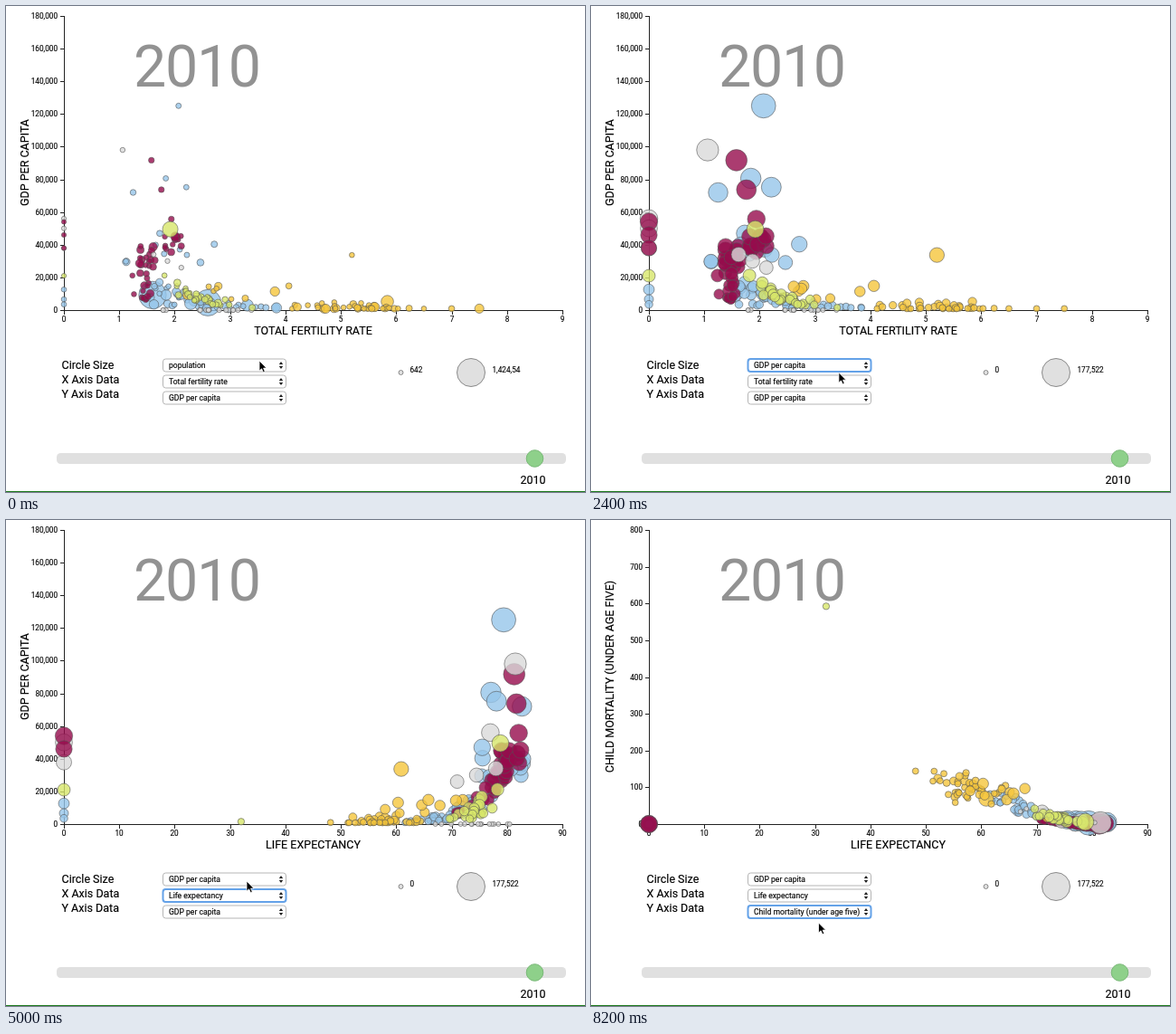
An HTML page for the animation above (8300 ms loop, 640 by 537 pixels).

```html
<!DOCTYPE html>
<html lang="en">
<head>
<meta charset="utf-8">
<title>Fertility, income and health</title>
<style>
html, body { margin: 0; width: 100%; height: 100%; overflow: hidden; background: #fff; }
svg { display: block; width: 100vw; height: 100vh; font-family: Roboto, sans-serif; }
.tick { font-size: 8.2px; stroke: #000; stroke-width: .12px; }
.label { font-size: 12.5px; stroke: #000; stroke-width: .15px; }
.opt { font-size: 8.6px; stroke: #000; stroke-width: .15px; }
.line { stroke: #222; fill: none; shape-rendering: crispEdges; }
.key { fill: #e0e0e0; stroke: #8a8a8a; }
.dots circle { fill-opacity: .8; stroke: #555; stroke-width: .9; stroke-opacity: .65; }
.select { fill: #fff; stroke: #b5b5b5; }
.focus { fill: none; stroke: #64a2e8; stroke-width: 2; }
.menu { font-family: Inter, sans-serif; font-size: 8.5px; filter: drop-shadow(0 2px 3px rgba(0,0,0,.3)); }
</style>
</head>
<body>
<svg id="stage" viewBox="0 0 640 537" preserveAspectRatio="none"></svg>
<script>
const LOOP = 8300;
const SIZE_AT = 1950, X_AT = 4580, Y_AT = 7760;
const X0 = 64, Y0 = 336, W = 551, H = 325, ROW = 12.4;
const OPTIONS = ['population', 'GDP per capita', 'Child mortality (under age five)',
  'Life expectancy', 'Total fertility rate'];
const stage = document.getElementById('stage');

function add(parent, tag, attrs = {}, text) {
  const el = document.createElementNS(stage.namespaceURI, tag);
  for (const name in attrs) el.setAttribute(name, attrs[name]);
  if (text !== undefined) el.textContent = text;
  parent.append(el);
  return el;
}
const group = (parent, cls) => add(parent, 'g', { class: cls || '' });
const put = (parent, x, y, text, cls, more) =>
  add(parent, 'text', { x, y, class: cls, ...more }, text);
const show = (el, on) => { el.style.display = on ? '' : 'none'; };
const setText = (el, s) => { if (el.textContent !== s) el.textContent = s; };

let seed = 2010;
function rnd() {
  seed = (seed * 1664525 + 1013904223) % 4294967296;
  return seed / 4294967296;
}
const range = (a, b) => a + (b - a) * rnd();
const mid = (a, b) => a + (b - a) * (rnd() + rnd() + rnd()) / 3;

// Countries: income in thousands, people in millions
const COLORS = { asia: '#96c5ea', europe: '#960b4c', africa: '#f5c63c',
  america: '#d7e66a', other: '#d9d9d9' };
const countries = [];

function mortality(region, life) {
  if (!life) return 0;
  if (region === 'africa' && life < 69) return 98 - 2.2 * (life - 57) + mid(-50, 55);
  const base = 4 + .23 * (82 - Math.min(life, 82)) ** 2;
  return base * (region === 'europe' ? .4 : range(.5, 1.25));
}
function country(region, fertility, income, life, people = 1 + 60 * rnd() ** 4) {
  countries.push({ region, fertility, income, life, people, deaths: mortality(region, life) });
}
function crowd(region, count, rule) {
  for (let i = 0; i < count; i++) country(region, ...rule(i));
}
// Income falls with fertility; life expectancy grows with the log of income
const earn = (top, f, low) => top * Math.exp(1.1 * (1.5 - f)) * range(low, 1.3);
const lifespan = (base, slope, income, spread) =>
  base + slope * Math.log(income) + range(-spread, spread);

// Incomplete records sit on the zero line
crowd('other', 3, i => [0, 56 / (1 + .12 * i * i), i ? 0 : 77, .1]);
crowd('america', 1, () => [0, 21, 0, .1]);
crowd('asia', 3, i => [0, 12.6 / 1.9 ** i, 0, 1]);
crowd('europe', 3, i => [0, 54 - 8 * i, i > 1 ? 82 : 0, .1]);

country('asia', 1.6, 9.2, 75.5, 1360);
country('asia', 2.6, 4.5, 66.5, 1230);
country('asia', 2.07, 125, 79.4, 2);
country('asia', 1.25, 72, 82.7, 5);
crowd('asia', 2, i => [1.84 + .37 * i, 80.6 - 5.4 * i, 77.1 + i, 2]);
crowd('asia', 9, () => [range(.9, 3), range(29, 50), range(75, 83)]);
crowd('asia', 42, () => {
  const f = 1.5 + 2.6 * rnd() ** 1.2, income = earn(18, f, .2);
  return [f, income, lifespan(62, 4.6, income, 2.5), 1 + 160 * rnd() ** 4];
});

crowd('europe', 3, i => [1.58 + .18 * i, 91.7 - 18 * i, 81.3 + .4 * i, 4]);
crowd('europe', 32, () => {
  const income = range(6, 42);
  return [mid(1.2, 1.72), income, lifespan(62, 5, income, 1.5)];
});
crowd('europe', 12, () => [range(1.75, 2.12), range(35, 46), range(79, 82.5)]);

country('africa', 5.2, 33.7, 60.9, 1);
country('africa', 5.84, 5.2, 60, 160);
crowd('africa', 42, () => [mid(3.6, 6.8), .8 + 4 * rnd() ** 2.2, mid(47, 68)]);
crowd('africa', 3, i => [7.5 - .5 * i, .9, 58 - i]);
crowd('africa', 9, () => [range(2.1, 4.1), range(5, 15), range(50, 76)]);

country('other', 1.06, 98, 81.5, .6);
crowd('other', 3, i => [1.62 + .25 * i, 34 - 4 * i, 78 - 3.5 * i, .3]);
crowd('other', 16, () => [range(1.6, 3.6), 0, range(67, 81), .2]);

country('america', 3.4, 1.5, 32, 10);
crowd('america', 28, () => {
  const f = mid(1.5, 3.2), income = earn(24, f, .5);
  return [f, income, lifespan(68, 3, income, 2.5)];
});
country('america', 1.92, 49.5, 78.8, 309);

const radius = share => 2.5 + 13 * Math.sqrt(share);

// Static parts
add(stage, 'rect', { width: 640, height: 537, fill: '#fff' });
put(stage, 141, 89, '2010', '',
  { 'font-size': 64.5, 'letter-spacing': -1.3, fill: '#929292' });

function axis(vertical, max, step) {
  const g = group(stage);
  for (let v = 0; v <= max; v += step) {
    const f = v / max;
    if (vertical) {
      const y = Math.round(Y0 - H * f);
      add(g, 'path', { class: 'line', d: `M60 ${y + .5}H64` });
      put(g, 57, y + 3, v.toLocaleString('en-US'), 'tick', { 'text-anchor': 'end' });
    } else {
      const x = Math.round(X0 + W * f);
      add(g, 'path', { class: 'line', d: `M${x + .5} 336V341` });
      put(g, x, 349, v, 'tick', { 'text-anchor': 'middle' });
    }
  }
  return g;
}
const xAxes = [axis(false, 9, 1), axis(false, 90, 10)];
const yAxes = [axis(true, 180000, 20000), axis(true, 800, 100)];
add(stage, 'path', { class: 'line', d: 'M64.5 11V336.5H615' });
const xTitle = put(stage, 339.5, 363, '', 'label', { 'text-anchor': 'middle' });
const yTitle = put(stage, 0, 0, '', 'label',
  { 'text-anchor': 'middle', transform: 'translate(25 173) rotate(-90)' });

const dots = group(stage, 'dots');
for (const c of countries) c.dot = add(dots, 'circle', { fill: COLORS[c.region] });

['Circle Size', 'X Axis Data', 'Y Axis Data'].forEach((s, i) =>
  put(stage, 61.5, 400.5 + 16.3 * i, s, 'label'));

const selects = [397, 415, 433].map(y => {
  const g = group(stage);
  const box = { x: 173.5, y: y - 7, width: 136, height: 14, rx: 3 };
  add(g, 'rect', { class: 'select', ...box });
  const focus = add(g, 'rect', { class: 'focus', ...box });
  add(g, 'path', { d: `M301.8 ${y - 1}l2.2 -3 2.2 3zM301.8 ${y + 1}l2.2 3 2.2 -3z`, fill: '#222' });
  return { focus, text: put(g, 180, y + 3.2, '', 'opt') };
});

add(stage, 'circle', { class: 'key', cx: 436.5, cy: 405, r: 2.5 });
add(stage, 'circle', { class: 'key', cx: 514, cy: 405, r: 15.5 });
const low = put(stage, 446.5, 405, '', 'tick');
const high = put(stage, 537.5, 405, '', 'tick');

add(stage, 'rect', { x: 56, y: 494, width: 563, height: 12, rx: 4.5, fill: '#e0e0e0' });
add(stage, 'circle', { cx: 584.5, cy: 500, r: 9.3, fill: '#8ed08a', stroke: '#79b877' });
put(stage, 568.5, 528, '2010', 'label');
add(stage, 'rect', { y: 536, width: 640, height: 1, fill: '#1c7a1c' });

// Pop-up menus: open and close times, hover change time, checked and hovered rows
const menus = [
  { top: 386, from: 700, to: 1900, hoverAt: 1250, checked: 0, hover: 1 },
  { top: 354.3, from: 2900, to: 4550, hoverAt: 3250, checked: 4, hover: 3 },
  { top: 409.2, from: 5800, to: 7730, hoverAt: 6500, checked: 1, hover: 2 }
];
for (const m of menus) {
  m.el = group(stage, 'menu');
  add(m.el, 'rect', { x: 165, y: m.top, width: 161, height: 69.5, rx: 4,
    fill: '#f3f3f3', 'fill-opacity': .95, stroke: '#ccc', 'stroke-width': .6 });
  m.bar = add(m.el, 'rect', { x: 165, width: 161, height: ROW, fill: '#4b95f5' });
  m.rows = OPTIONS.map((s, i) => put(m.el, 182, m.top + 13.2 + ROW * i, s));
  m.check = add(m.el, 'path', { d: `M170 ${m.top + 10.5 + ROW * m.checked}l2 2.6 3.8 -6`,
    fill: 'none', 'stroke-width': 1.3 });
}

const ring = add(stage, 'circle', { r: 16.5, fill: 'none', stroke: '#111', 'stroke-width': 1.4 });
const cursor = add(stage, 'path', { d: 'M0 0V11.2L2.6 8.8L4.4 12.8L6.3 12L4.6 8.1H8Z',
  fill: '#000', stroke: '#fff', 'stroke-width': .8 });
// Pointer stops: arrival time and place
const stops = [[0, 280, 392], [1450, 274.5, 404], [2750, 269, 414], [3400, 268.5, 401],
  [4980, 266, 399], [5700, 256, 432.5], [6700, 251.5, 445]];
const TRAVEL = 500, PRESS = 220;

const clamp = k => Math.min(1, Math.max(0, k));
const ease = k => k < .5 ? 4 * k ** 3 : 1 - (2 - 2 * k) ** 3 / 2;
const blend = (t, start, span) => ease(clamp((t - start) / span));
const mix = (a, b, k) => a + (b - a) * k;

function pointer(t) {
  let [, x, y] = stops[0];
  for (const [at, sx, sy] of stops) {
    const k = blend(t, at - TRAVEL, TRAVEL);
    x = mix(x, sx, k);
    y = mix(y, sy, k);
  }
  return [x, y];
}
const pressed = (t, at) => t >= at - 60 && t < at - 60 + PRESS;

function draw(t) {
  const ks = blend(t, SIZE_AT, 400), kx = blend(t, X_AT, 350), ky = blend(t, Y_AT, 350);
  for (const c of countries) {
    const x = mix(c.fertility / 9, c.life / 90, kx);
    const y = mix(c.income / 180, c.deaths / 800, ky);
    const r = mix(radius(c.people / 1424.54), radius(c.income / 177.522), ks);
    c.dot.setAttribute('cx', (X0 + W * x).toFixed(2));
    c.dot.setAttribute('cy', (Y0 - H * y).toFixed(2));
    c.dot.setAttribute('r', r.toFixed(2));
  }

  const sized = t >= SIZE_AT, moved = t >= X_AT, raised = t >= Y_AT;
  const chosen = [OPTIONS[sized ? 1 : 0], OPTIONS[moved ? 3 : 4], OPTIONS[raised ? 2 : 1]];
  const focused = t < 800 ? -1 : t < 3000 ? 0 : t < 6000 ? 1 : 2;
  selects.forEach((s, i) => {
    setText(s.text, chosen[i]);
    show(s.focus, i === focused);
  });
  setText(xTitle, chosen[1].toUpperCase());
  setText(yTitle, chosen[2].toUpperCase());
  setText(low, sized ? '0' : '642');
  setText(high, sized ? '177,522' : '1,424,54');
  xAxes.forEach((g, i) => show(g, i === +moved));
  yAxes.forEach((g, i) => show(g, i === +raised));

  for (const m of menus) {
    show(m.el, t >= m.from && t < m.to);
    const active = t < m.hoverAt ? m.checked : m.hover;
    m.bar.setAttribute('y', m.top + 3.9 + ROW * active);
    m.rows.forEach((row, i) => row.setAttribute('fill', i === active ? '#fff' : '#333'));
    m.check.setAttribute('stroke', active === m.checked ? '#fff' : '#222');
  }

  const [x, y] = pointer(t);
  const move = `translate(${x.toFixed(2)} ${y.toFixed(2)})`;
  cursor.setAttribute('transform', move);
  ring.setAttribute('transform', move);
  show(ring, menus.some(m => pressed(t, m.from) || pressed(t, m.to)));
}

const start = performance.now();
function frame() {
  draw((performance.now() - start) % LOOP);
  requestAnimationFrame(frame);
}
frame();
</script>
</body>
</html>
```
